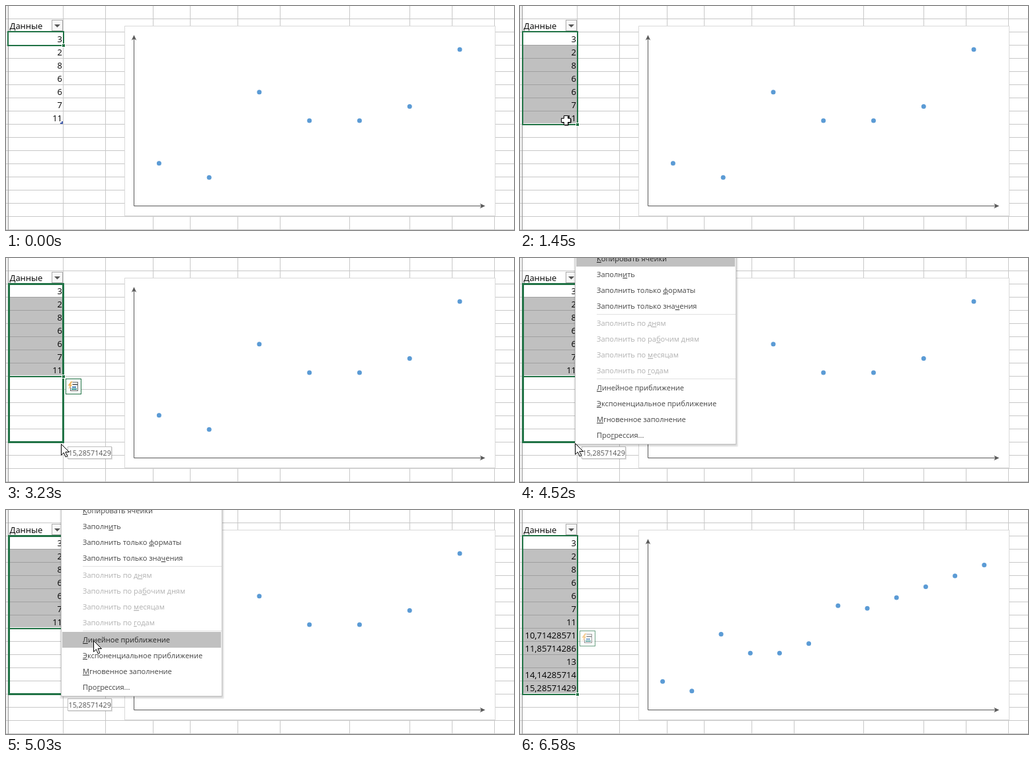
Animation of 768 by 340 pixels, one loop 7.88 s. Source, as an HTML page:

```html
<!DOCTYPE html>
<html lang="ru">
<head>
<meta charset="utf-8">
<title>Прогноз по данным</title>
<style>
html, body { margin: 0; width: 100%; height: 100%; overflow: hidden; background: #fff; }
svg { display: block; width: 100vw; height: 100vh; font-family: "Open Sans", "Noto Sans", sans-serif; }
.crisp { shape-rendering: crispEdges; }
.cell { font-size: 13px; fill: #000; }
.num { text-anchor: end; }
.menu { font-size: 11px; fill: #444; }
.menu .off { fill: #b1b1b1; }
.menu .on { fill: #262626; }
.tip { font-size: 10.8px; fill: #555; }
tspan { text-decoration: underline; }
</style>
</head>
<body>
<svg id="stage" viewBox="0 0 768 340"></svg>
<script>
const LOOP = 7880, GREEN = '#217346', AXIS = '#595959';
const stage = document.getElementById('stage');

function el(tag, attrs = {}, parent = stage, text) {
  const node = document.createElementNS('http://www.w3.org/2000/svg', tag);
  set(node, attrs);
  if (text !== undefined) node.textContent = text;
  parent.appendChild(node);
  return node;
}
function set(node, attrs) {
  for (const k in attrs) node.setAttribute(k, attrs[k]);
}
const group = (cls = '') => el('g', { class: cls });
const box = (x, y, width, height, fill, parent, extra) =>
  el('rect', { x, y, width, height, fill, ...extra }, parent);
const path = (d, attrs, parent) => el('path', { d, fill: 'none', ...attrs }, parent);
const show = (node, on) => { node.style.display = on ? '' : 'none'; };
const place = (node, x, y) => set(node, { transform: `translate(${x} ${y})` });

// Sheet grid
const grid = group('crisp');
box(0, 0, 3, 340, '#f1f1f1', grid);
for (let y = 19; y < 340; y += 20) box(0, y, 768, 1, '#c8c8c8', grid);
for (const x of [86, 150, 222, 278, 350, 414, 519, 610, 674, 738]) box(x, 0, 1, 340, '#c8c8c8', grid);
box(3, 0, 1, 340, '#9b9b9b', grid);

// Selection fill and row lines
const shade = group('crisp');
const fill = box(5, 60, 81, 0, '#c0c0c0', shade);
const rowLines = Array.from({ length: 11 }, (_, i) => box(5, 59 + 20 * i, 81, 1, '#a0a0a0', shade));

// Column header, filter button, values
const cells = group();
el('text', { class: 'cell', x: 5.5, y: 35 }, cells, 'Данные');
box(69.5, 21.5, 16, 16, '#f7f7f7', cells, { stroke: '#ababab' });
path('M73 28h9l-4.5 4.5z', { fill: '#555' }, cells);

const forecast = k => (67 + 8 * k) / 7;
const format = v => String(+v.toFixed(8)).replace('.', ',');
const values = [3, 2, 8, 6, 6, 7, 11];
for (let k = 1; k <= 5; k++) values.push(forecast(k));
const numbers = values.map((v, i) =>
  el('text', { class: 'cell num', x: 85, y: 55 + 20 * i }, cells, format(v)));
const corner = path('M86 175v4h-4v-2h2v-2z', { fill: '#4560b0' }, cells);

// Selection border, fill handle, drag outline
const border = group('crisp');
const frame = el('rect', { fill: 'none', stroke: GREEN, 'stroke-width': 2 }, border);
const outline = el('rect', { x: 4.5, y: 39.5, width: 82, fill: 'none', stroke: GREEN, 'stroke-width': 3 }, border);
const handle = box(84.5, 0, 5, 5, GREEN, border, { stroke: '#fff' });

// Chart
const chart = group();
box(179.5, 30.5, 560, 288, '#fff', chart, { stroke: '#d9d9d9' });
path('M193.5 48V303.5H720', { stroke: AXIS }, chart);
path('M193.5 44l3.7 8-3.7-2-3.7 2z', { fill: AXIS }, chart);
path('M724.5 303.5l-8 3.7 2-3.7-2-3.7z', { fill: AXIS }, chart);
const dots = values.map(() => el('circle', { r: 3.5, fill: '#5b9bd5' }, chart));
const point = (i, count, max) => ({
  x: 193.5 + 530.4 / count * (i + 0.5),
  y: 303.5 - 259 / max * values[i]
});

// Quick analysis button
const quick = group();
box(90.5, 183.5, 23, 23, '#fff', quick, { stroke: GREEN });
box(97.5, 188.5, 11, 13, '#fff', quick, { stroke: '#666' });
box(100, 191, 8, 2, '#777', quick);
box(100, 195, 6, 2, '#3c7fb8', quick);
box(99, 198, 8, 2, '#2f8f8a', quick);
path('M98 187h3l-3 5h3l-7 8 2-6h-3z', { fill: '#f0b45c', stroke: '#fff', 'stroke-width': .6 }, quick);

// Value hint
const tip = group('tip');
const tipShadow = box(1, 1, 0, 19, '#000', tip, { opacity: .12 });
const tipBox = box(.5, .5, 0, 18, '#fff', tip, { stroke: '#bebebe' });
const tipText = el('text', { x: 1.5, y: 14 }, tip);

// Context menu; "_" marks the access key
const ITEMS = [
  [1, '_Копировать ячейки'], [25, 'Заполн_ить'], [49, 'Заполнить только _форматы'],
  [73, 'Заполнить только зна_чения'], [99, 'Заполнить по д_ням', 1],
  [123, 'Заполнить по ра_бочим дням', 1], [147, 'Заполнить по _месяцам', 1],
  [171, 'Заполнить по _годам', 1], [197, '_Линейное приближение'],
  [221, '_Экспоненциальное приближение'], [245, '_Мгновенное заполнение'], [269, 'Про_грессия...']
];
const menu = group('menu');
for (let i = 4; i > 0; i--)
  box(83 - i + 2, -10, 242 + 2 * i - 1, 293 + i, '#000', menu, { opacity: .05, rx: 2 });
box(83.5, -10.5, 243, 293, '#fff', menu, { stroke: '#c6c6c6' });
for (const y of [85, 183]) box(116, y, 210, 1, '#e1e1e1', menu);
const hot = box(85, 0, 240, 24, '#c0c0c0', menu);
const labels = ITEMS.map(([y, label, off]) => {
  const [head, tail] = label.split('_');
  const text = el('text', { x: 116, y: y + 4, class: off ? 'off' : '' }, menu, head);
  el('tspan', {}, text, tail[0]);
  text.append(tail.slice(1));
  return text;
});

// Pointers
const CROSS = 'M-3-7H3V-3H7V3H3V7H-3V3H-7V-3H-3z';
const pointers = { arrow: group(), cross: group(), plus: group('crisp') };
path('M.5.5V17.2L4.4 13.5 7.2 20 9.8 18.9 7 12.5H12.5z', { fill: '#fff', stroke: '#000' }, pointers.arrow);
path(CROSS, { fill: '#000', transform: 'translate(1 1)' }, pointers.cross);
path(CROSS, { fill: '#fff', stroke: '#000' }, pointers.cross);
path('M-5.5 0h11M0-5.5v11', { stroke: '#000', 'stroke-width': 2 }, pointers.plus);

// Moves: start, end, steps, pointer, from, to
const MOVES = [
  [460, 800, 8, 'cross', [-3, 82], [60.5, 52.5]],
  [1060, 1450, 14, 'cross', [60.5, 57.5], [69.5, 173.5]],
  [1780, 1990, 8, 'cross', [69.5, 173.5], [87, 180]],
  [2690, 3230, 18, 'arrow', [83, 182], [83, 282]],
  [4520, 5030, 18, 'arrow', [83, 281], [132, 198]],
  [6030, 6580, 16, 'cross', [132, 198], [-12, 85]]
];
const smooth = p => p * p * (3 - 2 * p);
const mix = (a, b, p) => a + (b - a) * p;

function progress(t, [start, end, steps]) {
  const p = Math.min(1, Math.max(0, (t - start) / (end - start)));
  return smooth(Math.floor(p * (steps - 1) + 1e-6) / (steps - 1));
}

function pointerAt(t) {
  const move = MOVES.filter(m => t >= m[0]).pop();
  if (!move) return { kind: '', x: -20, y: 82 };
  const p = progress(t, move), [, , , kind, a, b] = move;
  const onHandle = t >= 1990 && t < 2690;
  return { kind: onHandle ? 'plus' : kind, x: mix(a[0], b[0], p), y: mix(a[1], b[1], p) };
}

function drawSelection(rows, dragRows) {
  const bottom = 40 + 20 * rows, left = rows > 1 ? 4 : 3;
  set(frame, { x: left, y: 39, width: 87 - left, height: bottom - 39 });
  set(handle, { y: bottom - 2.5 });
  set(fill, { height: Math.max(0, bottom - 62) });
  rowLines.forEach((line, i) => show(line, i < rows - 1));
  show(corner, rows < 7);
  show(outline, dragRows > 0);
  set(outline, { height: 140 + 20 * dragRows });
}

function drawTip(k, x, y) {
  show(tip, k > 0);
  if (k < 1) return;
  tipText.textContent = format(forecast(k));
  const width = Math.round(tipText.getComputedTextLength() + 2);
  set(tipBox, { width });
  set(tipShadow, { width: width + 1 });
  place(tip, Math.round(x) + 10, Math.round(y) + 4);
}

function drawMenu(open, at) {
  show(menu, open);
  if (!open) return;
  const found = at.x > 84 ? ITEMS.findIndex(([y]) => Math.abs(at.y - y) <= 12) : 0;
  show(hot, found >= 0);
  if (found >= 0) set(hot, { y: ITEMS[found][0] - 12 });
  labels.forEach((label, i) => set(label, { class: ITEMS[i][2] ? 'off' : i === found ? 'on' : '' }));
}

function drawChart(t) {
  const p = progress(t, MOVES[5]);
  dots.forEach((dot, i) => {
    const to = point(i, 12, 18);
    const from = i < 7 ? point(i, 7, 12) : { x: to.x, y: 303.5 };
    set(dot, { cx: mix(from.x, to.x, p), cy: mix(from.y, to.y, p) });
    show(dot, i < 7 || p > 0);
  });
}

function render(t) {
  const at = pointerAt(t), filled = t >= 6030, open = t >= 3760 && !filled;
  let rows = 1, dragRows = 0;
  if (filled) rows = 12;
  else if (t >= 1450) rows = 7;
  else if (t >= 1060) rows = Math.min(7, Math.floor((at.y - 40) / 20) + 1);
  if (t >= 2690 && !filled) dragRows = t < 3230 ? Math.round((at.y - 180) / 20) : 5;

  drawSelection(rows, dragRows);
  numbers.forEach((n, i) => show(n, i < 7 || filled));
  show(quick, t >= 1870);
  set(quick, { opacity: filled ? .65 : 1 });
  drawTip(dragRows, 83, t < 3230 ? at.y : 282);
  drawMenu(open, at);
  drawChart(t);
  for (const kind in pointers) {
    show(pointers[kind], kind === at.kind);
    place(pointers[kind], Math.round(at.x - .5) + (kind === 'cross' ? .5 : 0),
      Math.round(at.y - .5) + (kind === 'cross' ? .5 : 0));
  }
}

const begin = performance.now();
function tick() {
  render((performance.now() - begin) % LOOP);
  requestAnimationFrame(tick);
}
tick();
</script>
</body>
</html>
```
